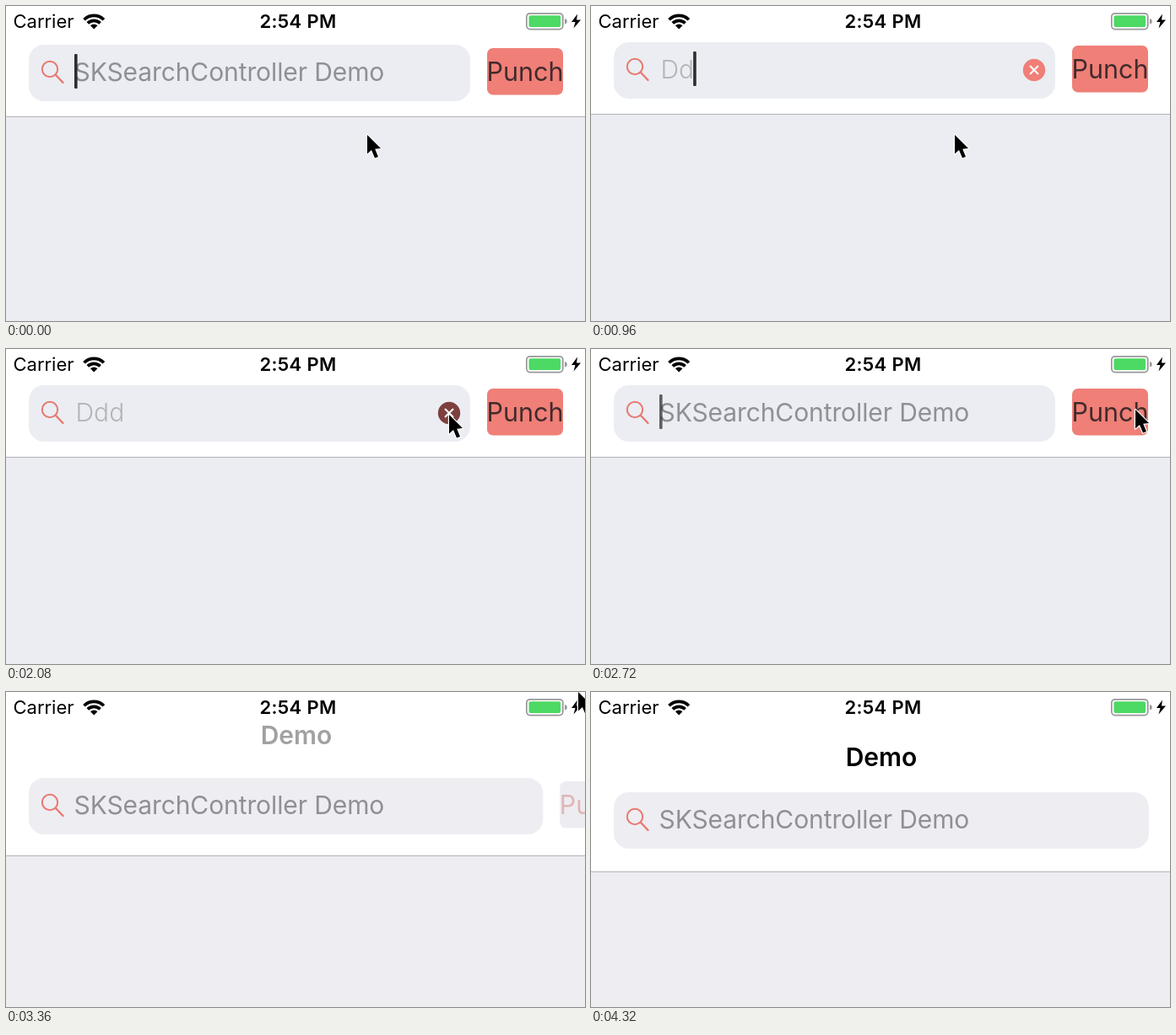
Recreate the animation shown at these times as an HTML page. Size 686x374 px, loop 4.4 s.

```html
<!DOCTYPE html>
<html lang="en">
<head>
<meta charset="utf-8">
<title>Search bar demo</title>
<style>
  html, body { margin: 0; width: 100%; height: 100%; overflow: hidden; background: #fff; }
  svg { display: block; font: 30px Inter, Roboto, sans-serif; }
  .status { font-size: 22px; }
  .bold { font-weight: 600; text-anchor: middle; }
</style>
</head>
<body>
<svg width="686" height="374" viewBox="0 0 686 374">
  <rect width="686" height="374" fill="#fff"/>
  <g id="content">
    <rect id="page" width="686" height="374"/>
    <rect width="686" height="1" fill="#b3b3b8"/>
  </g>

  <g id="bar">
    <rect id="field" x="27" height="67" rx="18"/>
    <g id="hint">
      <g fill="none" stroke="#e8796f" stroke-width="2" stroke-linecap="round">
        <circle cx="52" cy="29" r="9.2"/>
        <path d="M59 36L67.500 45" stroke-width="2.400"/>
      </g>
      <text id="placeholder" x="80.5" y="43" fill="#8f9095" letter-spacing="-.1">SKSearchController Demo</text>
    </g>
    <text id="typed" x="82.500" y="43" fill="#b3b4b8" font-weight="300"></text>
    <g id="clear">
      <circle id="disc" cx="525" cy="33" r="13.2"/>
      <path d="M520 28l10 10m0-10l-10 10" stroke="#fff" stroke-width="2"/>
    </g>
    <rect id="caret" y="11" width="3.600" height="41" rx="1" fill="#2d2d2f"/>
    <g id="button">
      <rect x="570" y="4" width="90" height="55.500" rx="7" fill="#edecf1"/>
      <rect id="red" x="570" y="4" width="90" height="55.500" rx="7" fill="#ef7f77"/>
      <text id="label" x="615" y="43" font-size="30.500" text-anchor="middle">Punch</text>
    </g>
  </g>

  <text id="title" class="bold" x="344">Demo</text>

  <text class="status" x="8.500" y="26">Carrier</text>
  <text class="status bold" x="346" y="26" letter-spacing=".3">2:54 PM</text>
  <g fill="none" stroke="#000" stroke-width="3.700">
    <path d="M92.500 16.200a16.500 16.500 0 0 1 23.400 0"/>
    <path d="M96.800 20.400a10.500 10.500 0 0 1 14.800 0"/>
  </g>
  <path d="M104.200 27.500l-4.200-4.200a6 6 0 0 1 8.400 0z"/>
  <rect x="616.800" y="8.800" width="43" height="18.800" rx="4" fill="none" stroke="#98989b" stroke-width="1.700"/>
  <rect x="619.500" y="11.300" width="37.600" height="13.800" rx="2" fill="#4cd964"/>
  <path d="M662 15a3.300 3.300 0 0 1 0 6.500z" fill="#98989b"/>
  <path d="M677 9.500l-7 9.500h4.500l-2 7.500 8.500-10h-5z"/>

  <path id="mouse" d="M0 0V22.500L5 18 9 27.500 13 26 9.200 16.800 16 16z"
        stroke="#fff" stroke-width="2.400" stroke-linejoin="round" paint-order="stroke"/>
</svg>
<script>
const LOOP = 4400, STEP = 80, DISMISS = 3160;
const $ = id => document.getElementById(id);
const set = (id, attrs) => {
  for (const k in attrs) $(id).setAttribute(k, attrs[k]);
};

// time, x, y of the pointer tip
const pointer = [
  [0, 428, 153], [560, 428, 153], [720, 431, 153], [960, 431, 153],
  [1120, 455, 138], [1280, 500, 103], [1440, 518, 87], [1680, 525, 78],
  [2160, 525, 78], [2320, 572, 80], [2480, 629, 75], [2720, 645, 72],
  [3120, 645, 72], [3200, 631, 70], [3360, 678, 0], [3440, 700, -40], [LOOP, 700, -40]
];

// time and strength of the text caret
const blink = [
  [0, 1], [1760, 1], [2000, 0], [2080, 0], [2160, 1], [2480, 1],
  [2560, .4], [2640, 0], [2720, .75], [2800, 1], [3040, 1], [3120, 0], [LOOP, 0]
];

function at(keys, t, col = 1) {
  const i = keys.findIndex(k => k[0] > t);
  const a = keys[i - 1], b = keys[i];
  return a[col] + (b[col] - a[col]) * (t - a[0]) / (b[0] - a[0]);
}

function draw(t) {
  const u = Math.min(1, Math.max(0, (t - DISMISS) / 288));
  const p = u * u * (3 - 2 * u);
  const settle = t < 80 ? 3 : t < 160 ? 1 : 0;
  const text = t < 560 || t >= 2160 ? "" : t < 960 ? "D" : t < 1040 ? "Dd" : "Ddd";
  const pressed = t >= 3120;
  const shade = pressed ? "#eeedf2" : "#ebedf2";

  set("content", { transform: `translate(0 ${Math.round(128 + 85 * p + settle)})` });
  set("page", { fill: shade });
  set("bar", { transform: `translate(0 ${43 + 76 * p + settle})` });
  set("field", { width: 523 + 111 * p, fill: shade });
  set("hint", { opacity: p > 0 && p < .2 ? .8 : 1 });
  set("placeholder", { opacity: text ? 0 : 1 });

  $("typed").textContent = text;
  set("clear", { opacity: text ? 1 : 0 });
  set("disc", { fill: t >= 1840 ? "#7d403f" : "#ef7f77" });
  set("caret", {
    x: text ? 82.500 + $("typed").getComputedTextLength() - 1 : 81,
    opacity: at(blink, t)
  });

  set("button", { transform: `translate(${111 * p} 0)`, opacity: Math.min(1, (1 - p) * 5) });
  set("red", { opacity: Math.max(0, 1 - 1.4 * p) });
  set("label", { fill: !pressed ? "#402b2c" : p < .2 ? "#a9605c" : "#e0b6b5" });

  set("title", { y: 88 - 116 * (1 - p), opacity: p ** 4 });
  set("mouse", { transform: `translate(${at(pointer, t)} ${at(pointer, t, 2)})` });
}

function tick() {
  const t = performance.now() % LOOP;
  draw(Math.floor(t / STEP) * STEP);
  requestAnimationFrame(tick);
}
tick();
</script>
</body>
</html>
```
